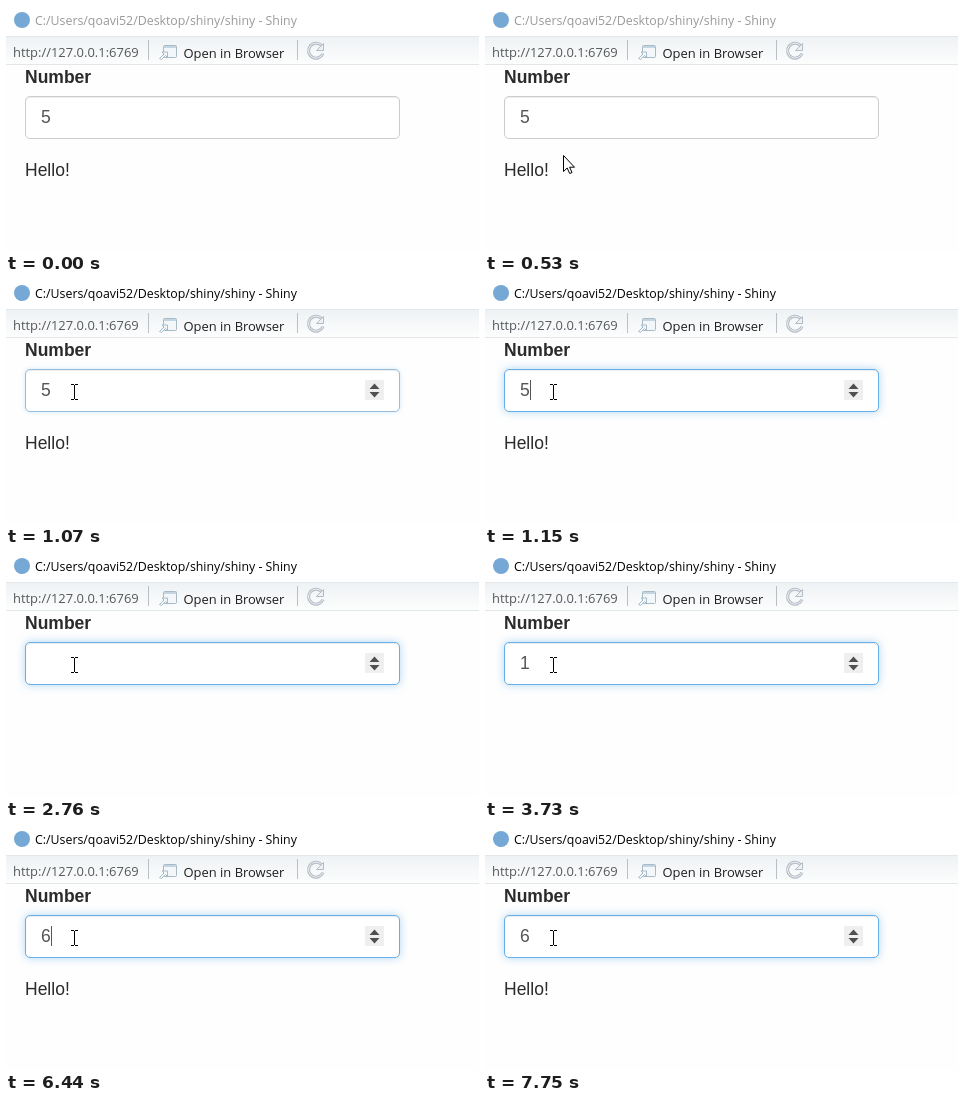
These frames come from a looping animation (473 px wide and 245 px high, 8 s). An HTML page:

```html
<!DOCTYPE html>
<html lang="en">
<head>
<meta charset="utf-8">
<title>Number input</title>
<style>
  html, body { margin: 0; width: 100%; height: 100%; overflow: hidden; background: #fefefe; }
  #stage { position: relative; width: 473px; height: 245px; overflow: hidden; }
  #stage > * { position: absolute; }
  #bar {
    box-sizing: border-box; left: 0; top: 30px; width: 473px; height: 29px;
    border: solid #e4e7e9; border-width: 1px 0;
    background: linear-gradient(#eff2f4, #fcfdfd);
  }
  #titlebar { left: 0; top: 0; width: 473px; height: 30px; background: #fff; }
  #field {
    box-sizing: border-box; left: 19px; top: 90px; width: 375px; height: 43px;
    border: 1px solid #ccc; border-radius: 5px; background: #fff;
    box-shadow: inset 0 1px 1px rgba(0, 0, 0, .075);
  }
  #field.half {
    border-color: #99bedb;
    box-shadow: inset 0 1px 1px rgba(0, 0, 0, .075), 0 0 4px rgba(102, 175, 233, .3);
  }
  #field.full {
    border-color: #66afe9;
    box-shadow: inset 0 1px 1px rgba(0, 0, 0, .075), 0 0 8px rgba(102, 175, 233, .5);
  }
  svg { left: 0; top: 0; }
  .ui { font-family: "Open Sans", "Noto Sans", sans-serif; font-size: 12.95px; }
  .page { font-family: "Liberation Sans", Arial, sans-serif; font-size: 17.5px; fill: #2b2b2b; }
</style>
</head>
<body>
<div id="stage">
  <div id="titlebar"></div>
  <div id="bar"></div>
  <div id="field"></div>
  <svg width="473" height="245" viewBox="0 0 473 245">
    <circle cx="16" cy="14" r="8" fill="#75a8d5"/>
    <text id="title" class="ui" x="29" y="19" style="font-size:12.35px">C:/Users/qoavi52/Desktop/shiny/shiny - Shiny</text>

    <text class="ui" x="7" y="51" fill="#55595c">http://127.0.0.1:6769</text>
    <path d="M142.5 34V54M291.5 34V54" stroke="#b9c0c5"/>
    <g stroke="#a9bac7" fill="#f3f7fa">
      <rect x="157.5" y="39.5" width="13" height="12" rx="1"/>
      <path d="M158 41H170" stroke="#c3d5e2" stroke-width="2"/>
      <path d="M153.5 52.5L158 48L156 46H161.5V51.5L159.5 49.5L155.5 53.5Z" stroke="#93acbf" stroke-width=".8"/>
    </g>
    <text class="ui" x="177.5" y="52" fill="#1d1f21">Open in Browser</text>
    <g fill="none" stroke="#b3bcc5">
      <path d="M315.5 39.5A7.5 7.5 0 1 0 317 47.5" stroke-width="3"/>
      <path d="M315.5 39.5A7.5 7.5 0 1 0 317 47.5" stroke="#eef1f4"/>
      <path d="M317.5 37.5V44.5H310.5Z" fill="#eef1f4"/>
    </g>

    <text class="page" x="19" y="77" font-weight="bold">Number</text>
    <text id="digit" class="page" x="35" y="117" style="fill:#555"></text>
    <text id="hello" class="page" x="19" y="170">Hello!</text>
    <rect id="caret" width="1" height="20" fill="#555"/>

    <g id="spin">
      <rect x="359" y="101" width="19" height="20" fill="#efefef"/>
      <path d="M363.5 110L368.5 104.5L373.5 110ZM363.5 113H373.5L368.5 118.5Z" fill="#505050"/>
    </g>

    <path id="arrow" d="M.5 .5V16.5L4.2 13L6.7 18.5L9 17.5L6.6 12.2H11.5Z" fill="#fff" stroke="#000"/>
    <path id="beam" d="M-3.5 -7.5H-.5M.5 -7.5H3.5M0 -7V7M-3.5 7.5H-.5M.5 7.5H3.5" fill="none" stroke="#000"/>
    <circle id="ring" cx="66.5" cy="112.5" r="10" fill="#fff" stroke="#777"/>
  </svg>
</div>
<script>
  const LOOP = 8000;
  const el = id => document.getElementById(id);
  const show = (id, on) => { el(id).style.display = on ? "" : "none"; };

  // [time, value] tables: the last entry reached holds
  const tracks = {
    digit: [[0, "5"], [2370, ""], [3240, "1"], [5090, ""], [6110, "6"]],
    hello: [[0, 1], [2760, 0], [6440, 1]],
    focus: [[0, ""], [1070, "half"], [1150, "full"]],
    ring: [[0, 0], [990, 1], [1070, 0]],
    caret: [[0, 0], [1150, 1], [1550, 0], [2130, 1], [2600, 0], [3170, 1], [3730, 0],
            [4310, 1], [4780, 0], [5310, 1], [5860, 0], [6110, 1], [6620, 0], [7180, 1], [7750, 0]]
  };

  function at(name, t) {
    let value;
    for (const [start, v] of tracks[name]) if (t >= start) value = v;
    return value;
  }

  // The pointer enters from below in eight eased hops, bowing to the right.
  function pointer(t) {
    if (t < 300) return null;
    const p = Math.min(7, Math.floor((t - 300) / 77)) / 7;
    const ease = 1 - (1 - p) ** 2;
    const bow = 84 * ease * (1 - ease);
    return { x: Math.round(43 + 25 * ease + bow), y: Math.round(222 - 109 * ease) };
  }

  function draw(t) {
    const digit = at("digit", t), focus = at("focus", t), ring = at("ring", t);
    el("digit").textContent = digit;
    el("field").className = focus;
    el("title").setAttribute("fill", focus ? "#000" : "#999");
    show("hello", at("hello", t));
    show("caret", at("caret", t));
    el("caret").setAttribute("x", digit ? 45 : 35);
    el("caret").setAttribute("y", digit ? 101 : 102);

    const pos = pointer(t);
    const inside = !!pos && pos.y < 133;
    show("spin", inside);
    show("ring", ring);
    show("beam", inside && !ring);
    show("arrow", pos && !inside);
    if (pos) {
      el("arrow").setAttribute("transform", `translate(${pos.x} ${pos.y})`);
      el("beam").setAttribute("transform", `translate(${pos.x + .5} ${pos.y})`);
    }
  }

  const begin = performance.now();
  function tick() {
    draw((performance.now() - begin) % LOOP);
    requestAnimationFrame(tick);
  }
  draw(0);
  requestAnimationFrame(tick);
</script>
</body>
</html>
```
